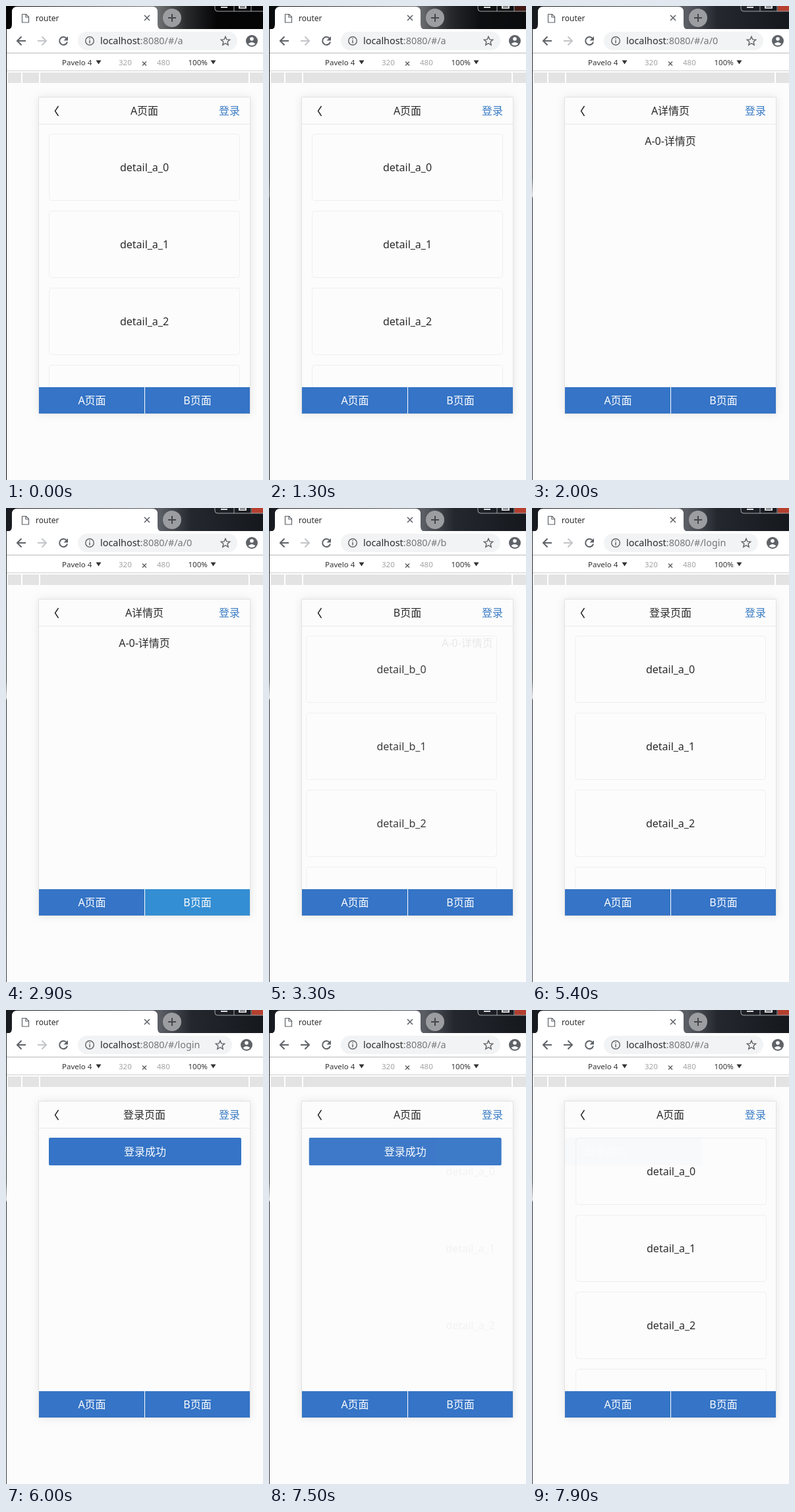
An HTML page for the animation above (8 s loop, 390 by 720 pixels).

```html
<!DOCTYPE html>
<html lang="zh">
<head>
<meta charset="utf-8">
<title>router</title>
<style>
  html, body { margin: 0; width: 100%; height: 100%; overflow: hidden; background: #fcfcfc; }
  svg { display: block; width: 390px; height: 720px; }
  text { font: 16px "Noto Sans", "Noto Sans CJK SC", "Noto Sans CJK", sans-serif; fill: #2b2b2b; }
  .mid { text-anchor: middle; }
  .white { fill: #fff; }
  .dev text { font-size: 11.5px; fill: #333; }
  .dev .dim { fill: #a3a3a3; }
  .icon { fill: none; stroke: #5f6368; stroke-width: 2; }
  .card { fill: none; stroke: #efefef; }
</style>
</head>
<body>
<svg viewBox="0 0 390 720">
  <defs>
    <linearGradient id="idle">
      <stop offset="0" stop-color="#000"/><stop offset=".58" stop-color="#77787a"/>
      <stop offset=".7" stop-color="#2a2b2d"/><stop offset=".82" stop-color="#050506"/>
    </linearGradient>
    <linearGradient id="active">
      <stop offset="0" stop-color="#16191e"/><stop offset=".6" stop-color="#5b5f65"/>
      <stop offset=".72" stop-color="#24282e"/><stop offset="1" stop-color="#15181d"/>
    </linearGradient>
    <linearGradient id="edge" x2="0" y2="1">
      <stop offset="0" stop-color="#22262c"/><stop offset=".33" stop-color="#3a3e44"/>
      <stop offset=".37" stop-color="#d8d9da"/><stop offset=".375" stop-color="#2c3037"/>
      <stop offset="1" stop-color="#3a3e45"/>
    </linearGradient>
    <filter id="shadow" x="-10%" y="-10%" width="120%" height="120%">
      <feDropShadow dx="0" dy="0" stdDeviation="7" flood-opacity=".1"/>
    </filter>
    <clipPath id="view"><path d="M50 180h320v399H50z"/></clipPath>
  </defs>

  <rect width="390" height="720" fill="#fcfcfc"/>

  <!-- window frame -->
  <path d="M0 0h390v36H0z" fill="url(#idle)"/>
  <path d="M0 0h1v720H0z" fill="#111"/>
  <g id="focus">
    <path d="M0 0h390v36H0z" fill="url(#active)"/>
    <path d="M0 35h1v685H0z" fill="url(#edge)"/>
    <path d="M373 0h17v8h-17z" fill="#b5402f"/>
  </g>
  <path d="M317 0v4q0 4 4 4h69M346 0v8M372 0v8" fill="none" stroke="#a5a8ac"/>
  <path d="M326 2h10M354 3h10V0h-10z" fill="none" stroke="#dcdcdc" stroke-width="2"/>

  <!-- tab -->
  <path d="M1 36q8 0 8-8V9q0-8 8-8h205q8 0 8 8v19q0 8 8 8z" fill="#fff"/>
  <path d="M24.5 12.500h6l4 4v8.500h-10zM30 12.500v4.500h4.500" fill="none" stroke="#5f6368" stroke-width="1.200"/>
  <text x="45" y="23" style="font-size:12px">router</text>
  <path class="icon" d="M210 14l8 8m0-8l-8 8" style="stroke-width:1.600"/>
  <circle cx="252" cy="18" r="14" fill="#9b9da0"/>
  <path class="icon" d="M246 18h12M252 12v12" style="stroke:#44474b"/>

  <!-- address bar -->
  <path d="M1 35h389v36H1z" fill="#fff"/>
  <path class="icon" d="M30 53H17m6.500-6.500L17 53l6.500 6.500"/>
  <path class="icon" id="forward" d="M48 53h13m-6.500-6.500L61 53l-6.500 6.500"/>
  <path class="icon" d="M92 49.500a6 6 0 1 0 1 5"/>
  <path d="M94 46v6.500h-6.500z" fill="#5f6368"/>
  <rect id="pill" x="109" y="39" width="242" height="28" rx="14" fill="#f1f3f4"/>
  <circle class="icon" cx="127" cy="53" r="6.300" style="stroke-width:1.400"/>
  <path class="icon" d="M127 52v4.500M127 49v1.600" style="stroke-width:1.500"/>
  <text x="143" y="58" style="font-size:14.400px">localhost<tspan id="path" fill="#74787c"></tspan></text>
  <g id="tools">
    <path class="icon" d="M333 46.500l1.900 4.400 4.800.4-3.600 3.200 1.100 4.700-4.200-2.500-4.200 2.500 1.100-4.700-3.600-3.200 4.800-.4z" style="stroke-width:1.400"/>
    <circle cx="373" cy="53" r="9" fill="#5f6368"/>
    <circle cx="373" cy="50" r="2.800" fill="#fff"/>
    <path d="M367.500 57.500q5.500-5 11 0-5.500 5-11 0z" fill="#fff"/>
  </g>

  <!-- device bar and ruler -->
  <g class="dev">
    <path d="M1 71h389v28H1z" fill="#fff"/>
    <path d="M1 71.500h389" stroke="#b9b9b9"/>
    <path d="M1 98.500h389" stroke="#cfcfcf"/>
    <text x="85" y="90">Pavelo 4</text>
    <path d="M136.500 82.500h8l-4 6zM310.500 82.500h8l-4 6z" fill="#333"/>
    <text class="dim" x="171" y="90">320</text>
    <path d="M207 84.500l6 6m0-6l-6 6" stroke="#555" stroke-width="1.200"/>
    <text class="dim" x="229" y="90">480</text>
    <text x="276.500" y="90">100%</text>
    <path d="M1 99h389v19H1z" fill="#fff"/>
    <path d="M3 101h20v16H3zM25 101h25v16H25zM52 101h316v16H52zM370 101h20v16h-20z" fill="#e3e3e3"/>
  </g>

  <!-- phone -->
  <path d="M50 139h320v480H50z" fill="#fcfcfc" filter="url(#shadow)"/>
  <path d="M49.500 138.500h321v481h-321z" fill="none" stroke="#e2e2e2"/>
  <g id="pages" clip-path="url(#view)"></g>
  <path d="M50 179.500h320" stroke="#e9e9e9"/>
  <path d="M79.500 152l-5 7.500 5 7.500" fill="none" stroke="#222" stroke-width="1.400"/>
  <text class="mid" id="title" x="210" y="165"></text>
  <text x="355" y="165" text-anchor="end" style="fill:#3a7cc4">登录</text>
  <path d="M50 579h320v40H50z" fill="#3574c6"/>
  <path id="tap" d="M211 579h159v40H211z" fill="#33b5e5" fill-opacity=".4"/>
  <path d="M210.500 579v40" stroke="#fff"/>
  <text class="mid white" x="130.500" y="605">A页面</text>
  <text class="mid white" x="290.500" y="605">B页面</text>
</svg>
<script>
const LOOP = 8000, TICK = 100, SLIDE = 500, SHIFT = 100;
const $ = id => document.getElementById(id);
const clamp = v => Math.min(1, Math.max(0, v));

const label = (x, y, s, cls = '') => `<text class="mid ${cls}" x="${x}" y="${y}">${s}</text>`;
const list = name => [0, 1, 2, 3].map(i =>
  `<rect class="card" x="65.5" y="${194.5 + 117 * i}" width="289" height="101" rx="4"/>` +
  label(210, 251 + 117 * i, `detail_${name}_${i}`)).join('');

const views = {
  a: { title: 'A页面', path: 'a', body: list('a') },
  detail: { title: 'A详情页', path: 'a/0', body: label(210, 211, 'A-0-详情页') },
  b: { title: 'B页面', path: 'b', body: list('b') },
  login: {
    title: '登录页面', path: 'login',
    body: '<rect x="65" y="194" width="292" height="42" rx="2" fill="#3574c6"/>' +
      label(211, 221, '登录成功', 'white')
  }
};
for (const [key, view] of Object.entries(views)) {
  $('pages').insertAdjacentHTML('beforeend', `<g id="page-${key}">${view.body}</g>`);
  view.el = $('page-' + key);
}

// at: route change, slide: start of the page transition, from: side the new page enters
const routes = [
  { at: 0, slide: -SLIDE, view: 'a', from: 1 },
  { at: 1400, slide: 1480, view: 'detail', from: -1 },
  { at: 3000, slide: 2980, view: 'b', from: -1 },
  { at: 3700, slide: 3690, view: 'a', from: -1 },
  { at: 5400, slide: 5400, view: 'login', from: 1 },
  { at: 7400, slide: 7470, view: 'a', from: 1 }
];

// cubic-bezier(.25, .1, .25, 1)
function ease(x) {
  let lo = 0, hi = 1;
  const curve = (s, p, q) => 3 * p * s * (1 - s) ** 2 + 3 * q * s * s * (1 - s) + s ** 3;
  for (let i = 0; i < 20; i++) {
    const s = (lo + hi) / 2;
    if (curve(s, .25, .25) < x) lo = s; else hi = s;
  }
  return x >= 1 ? 1 : curve(lo, .1, 1);
}

function place(el, x, opacity) {
  el.setAttribute('transform', `translate(${x.toFixed(2)} 0)`);
  el.setAttribute('opacity', opacity);
}

function draw(t) {
  const index = routes.findLastIndex(r => t >= r.at);
  const route = routes[index], view = views[route.view];
  const p = ease(clamp((t - route.slide) / SLIDE));

  for (const v of Object.values(views)) place(v.el, 0, 0);
  if (index) place(views[routes[index - 1].view].el, -route.from * SHIFT * p, 1 - p);
  place(view.el, route.from * SHIFT * (1 - p), p);

  $('title').textContent = view.title;
  $('path').textContent = ':8080/#/' + view.path;
  const inset = route.view === 'login' ? 8 : 0;
  $('pill').setAttribute('width', 242 - inset);
  $('tools').setAttribute('transform', `translate(${-inset} 0)`);
  $('forward').style.stroke = t >= 7400 ? '#5f6368' : '#c3c5c8';
  $('focus').setAttribute('opacity', clamp((t - 1200) / 300));
  $('tap').setAttribute('opacity', t >= 2900 && t < 3000 ? 1 : 0);
}

const start = performance.now();
function frame() {
  const t = (performance.now() - start) % LOOP;
  draw(Math.floor(t / TICK) * TICK);
  requestAnimationFrame(frame);
}
frame();
</script>
</body>
</html>
```
